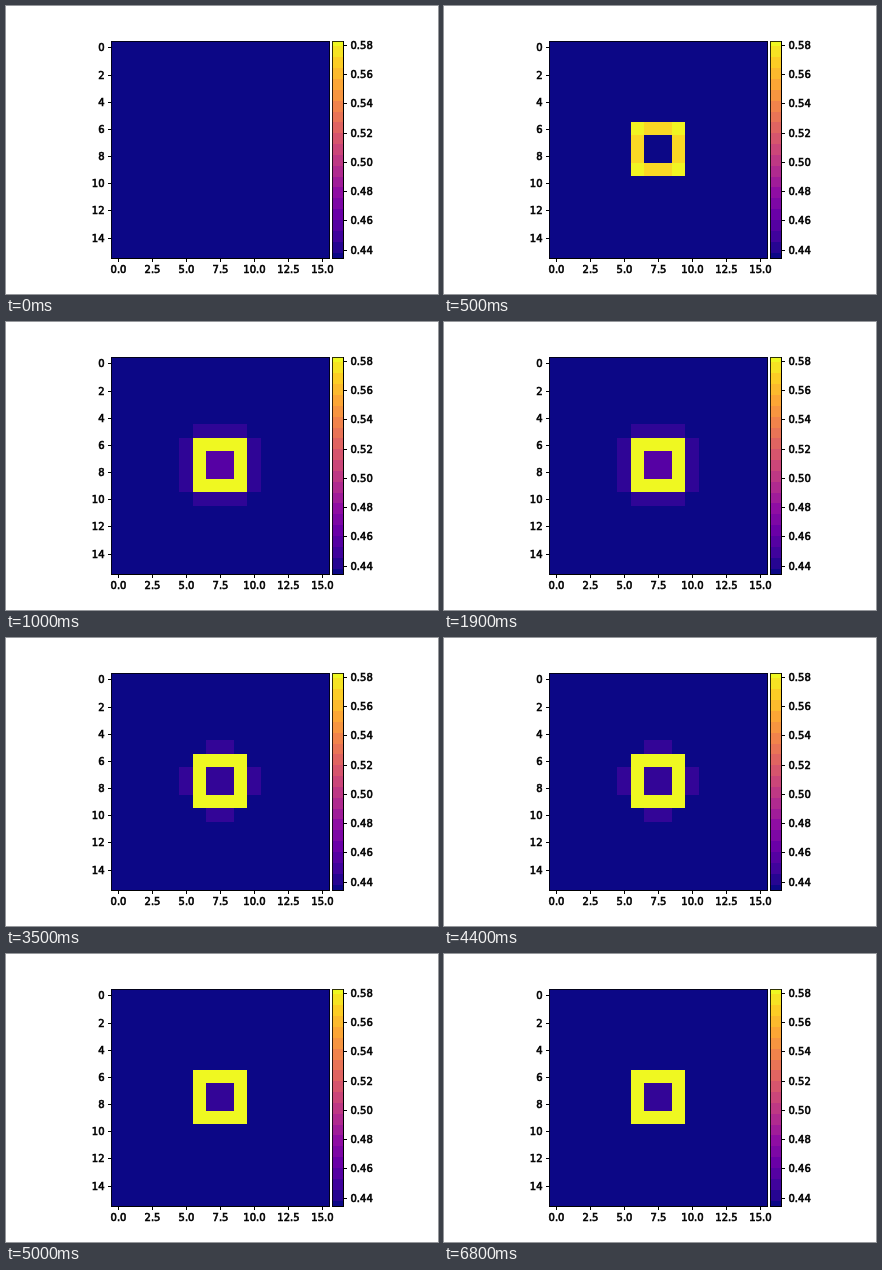
An HTML page that plays this animation: 432 px wide and 288 px high, repeating every 8 s.

```html
<!DOCTYPE html>
<html lang="en">
<head>
<meta charset="utf-8">
<title>Heat map</title>
<style>
  html, body { margin: 0; width: 100%; height: 100%; overflow: hidden; background: #fff; }
  svg { display: block; width: 432px; height: 288px; }
  rect { shape-rendering: crispEdges; }
  text { font: 10px "DejaVu Sans", sans-serif; fill: #000; stroke: #000; stroke-width: .6px; }
</style>
</head>
<body>
<svg id="plot" viewBox="0 0 432 288"></svg>
<script>
const svg = document.getElementById('plot');
const LOOP = 8000, CELL = 13.6, LEFT = 105.2, TOP = 34.2;
const BASE = '#0c0786', HOT = '#eff821', DIM = '#330597';
const PLASMA = ['0c0786', '40039c', '6a00a7', '8f0da3', 'b02a8f', 'cb4679',
  'e06461', 'f1834b', 'fca635', 'fccd25', 'eff821'];

// Start time, ring corners, ring sides, centre, halo colour, halo width in cells
const STEPS = [
  [0, BASE, BASE, BASE, BASE, 0],
  [500, '#f1f422', '#fad824', BASE, BASE, 0],
  [1000, HOT, HOT, '#5601a4', '#2f0596', 4],
  [2500, HOT, HOT, '#48039f', '#2f0596', 4],
  [3500, HOT, HOT, DIM, DIM, 2],
  [5000, HOT, HOT, DIM, BASE, 0]
];

function add(name, attrs, parent = svg) {
  const el = document.createElementNS('http://www.w3.org/2000/svg', name);
  for (const key in attrs) el.setAttribute(key, attrs[key]);
  return parent.appendChild(el);
}

function box(x, y, width, height, fill = '#000', parent = svg) {
  return add('rect', { x, y, width, height, fill }, parent);
}

function label(str, x, y, anchor) {
  add('text', { x, y, 'text-anchor': anchor }).textContent = str;
}

// The colours below show faintly through the frame line
function outline(x, y, w, h) {
  const g = add('g', { opacity: .8 });
  box(x, y, w, 1, '#000', g);
  box(x, y + h - 1, w, 1, '#000', g);
  box(x, y, 1, h, '#000', g);
  box(x + w - 1, y, 1, h, '#000', g);
}

function plasma(t) {
  const p = t * (PLASMA.length - 1);
  const i = Math.min(Math.floor(p), PLASMA.length - 2);
  const part = (hex, k) => parseInt(hex.slice(k, k + 2), 16);
  const mix = k => Math.round(part(PLASMA[i], k) * (1 - p + i) + part(PLASMA[i + 1], k) * (p - i));
  return `rgb(${mix(0)},${mix(2)},${mix(4)})`;
}

const px = col => Math.round(LEFT + CELL * col);
const py = row => Math.round(TOP + CELL * row);

function cells(parent, col, row, w, h, fill) {
  box(px(col), py(row), px(col + w) - px(col), py(row + h) - py(row), fill, parent);
}

function drawStep([, corner, side, centre, halo, span]) {
  const g = add('g', { visibility: 'hidden' });
  if (span) {
    const from = 8 - span / 2;
    for (const edge of [5, 10]) {
      cells(g, from, edge, span, 1, halo);
      cells(g, edge, from, 1, span, halo);
    }
  }
  cells(g, 6, 6, 4, 4, corner);
  cells(g, 7, 6, 2, 4, side);
  cells(g, 6, 7, 4, 2, side);
  cells(g, 7, 7, 2, 2, centre);
  return g;
}

box(0, 0, 432, 288, '#fff');
box(105, 35, 219, 218);
box(105, 35, 219, 217, BASE);
const layers = STEPS.map(drawStep);
outline(105, 35, 219, 218);

// Each band is centred on its level, so the end bands are half as tall
const BANDS = 20;
const bandY = i => Math.round(35 + 217 * Math.min(Math.max(i, 0), BANDS) / BANDS);
box(326, 35, 12, 218);
for (let i = 0; i <= BANDS; i++) {
  const y = bandY(i - .5);
  box(326, y, 11, bandY(i + .5) - y, plasma(1 - i / BANDS));
}
outline(326, 35, 12, 218);

for (let i = 0; i < 7; i++) {
  const x = 112 + 34 * i;
  box(x, 253, 1, 3);
  label((2.5 * i).toFixed(1), x + .5, 267, 'middle');
}
for (let i = 0; i < 8; i++) {
  const y = Math.round(41.355 + 27.18 * i);
  box(102, y, 3, 1);
  label(2 * i, 98.5, y + 4, 'end');
  const barY = Math.round(39 + 29.23 * i);
  box(338, barY, 3, 1);
  label((.58 - .02 * i).toFixed(2), 344.5, barY + 4, 'start');
}

let shown = -1;
function render(now) {
  const t = now % LOOP;
  let step = 0;
  while (step + 1 < STEPS.length && t >= STEPS[step + 1][0]) step++;
  if (step !== shown) {
    layers.forEach((g, i) => g.setAttribute('visibility', i === step ? 'visible' : 'hidden'));
    shown = step;
  }
}

let start = null;
function tick(now) {
  if (start === null) start = now;
  render(now - start);
  requestAnimationFrame(tick);
}
render(0);
requestAnimationFrame(tick);
</script>
</body>
</html>
```
